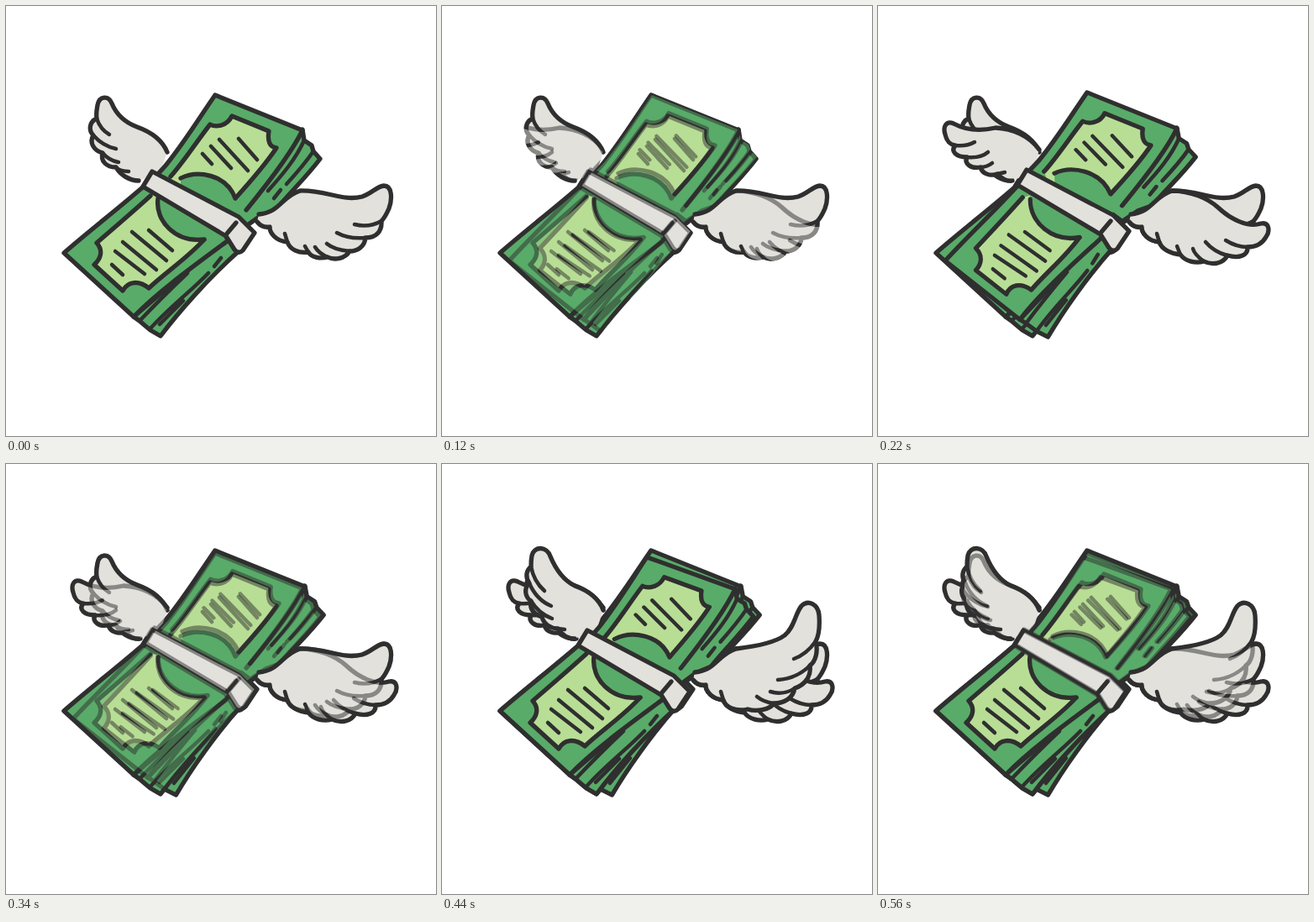
An HTML page that plays this animation: 512 by 512 pixels, repeating every 660 ms.

```html
<!DOCTYPE html>
<html lang="en">
<head>
<meta charset="utf-8">
<title>Flying money</title>
<style>
  html, body { margin: 0; width: 100%; height: 100%; overflow: hidden; background: #fff; }
  svg { display: block; width: 100%; height: 100%; }
</style>
</head>
<body>
<svg id="stage" viewBox="0 0 512 512"></svg>
<script>
const INK = '#2f2f2f', GREEN = '#59ab69', LIGHT = '#b8de95', WHITE = '#e2e1dc';
const BOLD = 5.3, FINE = 4.5;

const fill = (d, color) => `<path d="${d}" fill="${color}" stroke="none"/>`;
const line = (d, width = BOLD) => `<path d="${d}" stroke-width="${width}"/>`;
const shape = (d, color) => `<path d="${d}" fill="${color}"/>`;
const group = (body, transform) => `<g transform="${transform || 'translate(0 0)'}">${body}</g>`;

// Fill reaches on under a neighbouring part; only the given curve is inked.
const open = (d, under, color) => fill(d + under + 'Z', color) + line(d);

const upperHalf =
  shape('M353 147L355 160L364 166L366 173L374 182C355 207 336 224 322 242L304 249L286 262L270 250Z', GREEN) +
  line('M355 160C345 182 330 200 312 220M366 173C355 189 345 200 334 212M327 219L319 229', FINE) +
  open('M180 201L190 190C212 163 231 132 249 106L353 148C340 175 312 211 286 243', 'L274 252', GREEN) +
  open('M196 203C212 185 228 160 243 141C250 145 263 143 269 131L313 149C311 161 314 168 322 169C308 190 292 208 273 229', 'L268 242L200 216', LIGHT) +
  open('M208 205C228 195 262 200 273 229', 'L273 248L208 218', GREEN) +
  line('M277 158L299 183M254 159L288 196M244 167L268 193M234 176L245 188', FINE);

const lowerHalf =
  shape('M262 276L152 370L159 375L166 381L172 386L184 393C205 365 240 325 277 292Z', GREEN) +
  line('M159 375C177 356 195 338 216 318M171 385C195 358 220 340 241 318M248 310L256 300M183 379L211 351', FINE) +
  open('M166 213C134 241 100 267 69 294L152 370C180 341 220 312 262 281', 'L255 264', GREEN) +
  open('M172 226C150 246 130 263 108 282C116 291 113 301 105 308L139 339C145 328 158 326 170 336C190 317 215 301 236 278', 'L242 258L182 224', LIGHT) +
  open('M181 229C177 256 202 282 236 278', 'L250 268L181 224', GREEN) +
  line('M170 267L198 291M150 269L191 303M139 281L179 314M130 292L165 319M126 308L139 320', FINE);

const strap =
  shape('M174 197L277 251L296 270L282 291Q277 296 272 290L262 274L163 215Z', WHITE) +
  line('M263 271L274 258');

const wingRoot = 'M301 248C326 246 328 227 350 220';
const wingTail = 'C349 295 338 290 335 281C322 280 314 271 314 263C308 264 303 262 299 257';

const poses = {
  level: {
    left: 'M192 174C185 157 170 149 156 144C140 138 131 128 126 116C122 106 111 107 109 118C108 124 107 128 108 134C99 138 98 148 104 154C99 162 104 172 115 175C112 185 120 192 131 192C136 201 147 208 158 208',
    leftMarks: 'M108 134C111 143 116 149 123 153M104 154C112 163 121 168 131 170M115 175C121 182 128 185 134 186M131 192C136 197 142 197 146 197',
    right: wingRoot + 'C382 219 400 233 424 227C436 223 441 215 450 214C460 214 460 230 456 241C453 248 451 252 447 256C448 269 440 276 428 276C427 287 418 292 409 292C404 301 391 303 383 299C375 301 364 300 360 293' + wingTail,
    rightMarks: 'M447 256C438 261 426 263 415 260M428 276C416 277 403 275 394 270M409 292C398 291 388 288 382 283M383 299C376 296 371 292 368 287M360 293L356 286M335 281L332 271'
  },
  down: {
    upper: 'matrix(1.017 .0174 .029 .98 -7.4 -5.3)',
    lower: 'matrix(.969 -.0715 .111 1 -19.5 14.2)',
    strap: 'translate(3 -2)',
    left: 'M192 171C180 154 160 146 140 145C118 150 103 147 90 140C81 136 77 144 80 153C82 162 86 165 92 166C86 173 93 180 106 180C102 188 111 194 122 192C124 200 134 203 142 200C148 206 154 209 160 208',
    leftMarks: 'M92 166C100 167 108 166 115 162M106 180C116 181 125 179 131 174M122 192C128 192 132 190 136 187M142 200L151 198',
    right: wingRoot + 'C372 220 393 229 405 240C420 254 440 264 456 259C466 257 467 268 462 275C457 284 449 287 440 287C441 297 430 301 416 297C411 307 398 309 388 304C378 307 366 304 360 296' + wingTail,
    rightMarks: 'M440 287C430 287 422 284 414 279M416 297C404 294 396 288 390 281M388 304C381 299 376 293 375 289M360 296L356 286M335 281L332 271'
  },
  up: {
    upper: 'matrix(1 -.028 .024 .973 -7.6 14.8)',
    strap: 'translate(-1 1)',
    left: 'M192 174C186 158 172 150 158 145C142 137 134 122 129 110C125 98 110 97 107 109C106 114 106 118 106 122C100 127 99 135 104 142C97 148 99 159 106 163C104 173 110 179 119 182C121 191 130 196 138 196C143 204 150 208 158 208',
    leftMarks: 'M106 122C108 133 114 144 122 151M104 142C110 156 118 164 130 169M106 163C112 173 120 180 131 184M138 196L146 197',
    right: wingRoot + 'C375 217 396 213 408 204C420 194 420 179 428 169C436 161 448 167 449 180C450 194 449 204 445 211C456 214 460 224 452 236C448 242 443 244 438 240C440 253 432 263 420 267C418 279 407 285 395 285C390 293 374 295 364 292'.replace('C456 214 460 224 452 236C448 242 443 244 438 240', 'C448 223 445 235 438 240') + wingTail,
    rightMarks: 'M445 211C438 221 430 228 419 232M438 240C428 250 414 256 400 257M420 267C411 273 400 274 391 271M395 285C386 284 380 281 375 277M335 281L332 271'
  }
};
poses.up.right = wingRoot + 'C375 217 396 213 408 204C420 194 420 179 428 169C436 161 448 167 449 180C450 194 449 204 445 211C448 223 445 235 438 240C440 253 432 263 420 267C418 279 407 285 395 285C390 293 374 295 364 292' + wingTail;

const drawPose = p =>
  open(p.left, 'L184 198', WHITE) + line(p.leftMarks, FINE) +
  group(lowerHalf, p.lower) + group(upperHalf, p.upper) +
  open(p.right, '', WHITE) + line(p.rightMarks, FINE) +
  group(strap, p.strap);

const use = (name, extra = '') => `<use href="#${name}" ${extra}/>`;
const HALF = 'opacity=".5"';
const both = use('level') + use('down');
const all = both + use('up');

// Poses pile up over the loop, with half-strength blends between them.
const phases = [
  [120, use('level')],
  [100, use('level') + `<g mask="url(#inside)">${use('down', HALF)}</g>`],
  [120, both],
  [100, both + use('level', HALF)],
  [120, all],
  [100, all + use('level', HALF)]
];
const loop = phases.reduce((sum, [ms]) => sum + ms, 0);

const stage = document.getElementById('stage');
stage.innerHTML = '<defs>' +
  Object.entries(poses).map(([name, p]) =>
    `<g id="${name}" fill="none" stroke="${INK}" stroke-width="${BOLD}" stroke-linecap="round" stroke-linejoin="round">${drawPose(p)}</g>`
  ).join('') +
  `<mask id="inside" style="mask-type:alpha" maskUnits="userSpaceOnUse" x="0" y="0" width="512" height="512">${use('level')}</mask></defs>` +
  phases.map(([, body]) => `<g class="phase" display="none">${body}</g>`).join('');
const layers = [...stage.querySelectorAll('.phase')];

function show(time) {
  let rest = time % loop, now = 0;
  while (rest >= phases[now][0]) rest -= phases[now++][0];
  layers.forEach((layer, i) => layer.setAttribute('display', i === now ? 'inline' : 'none'));
}

const start = performance.now();
function tick() {
  show(performance.now() - start);
  requestAnimationFrame(tick);
}
tick();
</script>
</body>
</html>
```
